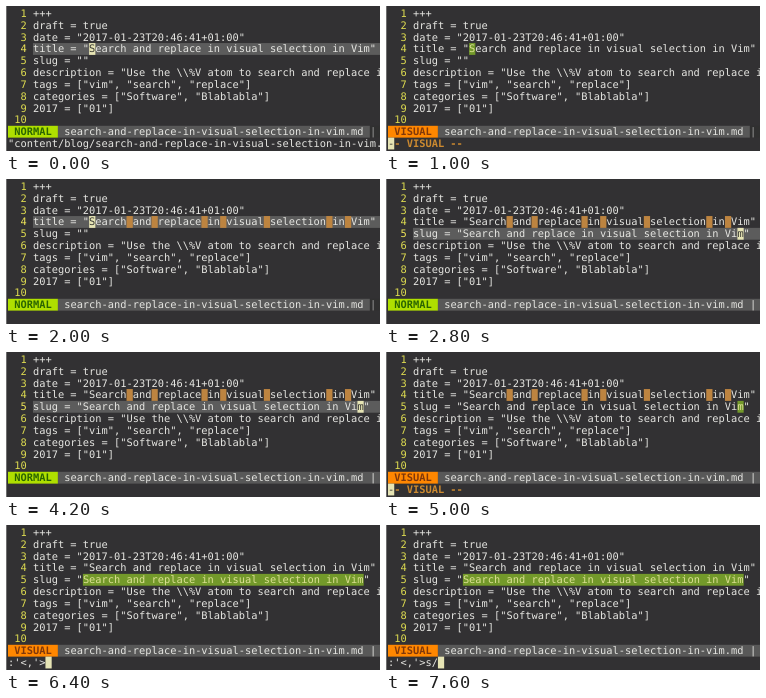
Write an HTML page that moves like this. It is 374x145 px and loops after 8 s.

```html
<!DOCTYPE html>
<html lang="en">
<head>
<meta charset="utf-8">
<title>Vim session</title>
<style>
  html, body { margin: 0; width: 100%; height: 100%; overflow: hidden; background: #323133; }
  svg { display: block; width: 374px; height: 145px; }
  text {
    font: 10.365px "DejaVu Sans Mono", monospace;
    white-space: pre;
    text-rendering: geometricPrecision;
  }
</style>
</head>
<body>
<svg id="screen" viewBox="0 0 374 145"></svg>
<script>
const LOOP = 8000;
const CELL = 6.24, LINE = 11.82, LEFT = 2, TOP = 1.6, WIDTH = 374, HEIGHT = 145, GUTTER = 4;
const STATUS = 10, COMMAND = 11;
const COLOR = {
  text: '#e6e6e2', number: '#dedc50', currentNumber: '#f0e658', border: '#6e6e6e',
  cursorLine: '#5c5c5c', cursor: '#e6e4b4', cursorText: '#3a3a34',
  match: '#bd8440', visual: '#73992a', visualText: '#dce094', modeMessage: '#cc8a30',
  statusFile: '#585858', statusRest: '#303030', statusDim: '#9e9e9e'
};
const MODES = {
  NORMAL: { back: '#afdf00', ink: '#2a6400' },
  VISUAL: { back: '#ff8700', ink: '#80380a' }
};
const TITLE = 'Search and replace in visual selection in Vim';
const FILE = 'search-and-replace-in-visual-selection-in-vim.md';
const TITLE_ROW = 3, TITLE_COL = 9, SLUG_ROW = 4, SLUG_COL = 8;
const LAST = TITLE.length - 1;

// Each step overrides the state before it; cursor and selection use [row, column(, length)].
const STEPS = [
  { at: 0, mode: 'NORMAL', slug: '', modified: false, matches: false, line: TITLE_ROW,
    cursor: [TITLE_ROW, GUTTER + TITLE_COL], selection: null,
    command: `"content/blog/${FILE}" 42L, 1337C` },
  { at: 1000, mode: 'VISUAL', line: null, command: '-- VISUAL --',
    cursor: [COMMAND, 0], selection: [TITLE_ROW, TITLE_COL, 1] },
  { at: 1200, cursor: [TITLE_ROW, GUTTER + TITLE_COL] },
  { at: 1400, cursor: [TITLE_ROW, GUTTER + TITLE_COL + LAST],
    selection: [TITLE_ROW, TITLE_COL, TITLE.length] },
  { at: 2000, mode: 'NORMAL', line: TITLE_ROW, command: '', matches: true,
    cursor: [TITLE_ROW, GUTTER + TITLE_COL], selection: null },
  { at: 2200, line: SLUG_ROW, cursor: [SLUG_ROW, GUTTER + SLUG_COL] },
  { at: 2600, slug: TITLE, modified: true, cursor: [SLUG_ROW, GUTTER + SLUG_COL + LAST] },
  { at: 5000, mode: 'VISUAL', line: null, command: '-- VISUAL --',
    cursor: [COMMAND, 0], selection: [SLUG_ROW, SLUG_COL + LAST, 1] },
  { at: 5200, cursor: [SLUG_ROW, GUTTER + SLUG_COL + LAST] },
  { at: 5400, matches: false, selection: [SLUG_ROW, SLUG_COL, TITLE.length] },
  { at: 6400, command: ":'<,'>", cursor: [COMMAND, 6] },
  { at: 7400, command: ":'<,'>s", cursor: [COMMAND, 7] },
  { at: 7600, command: ":'<,'>s/", cursor: [COMMAND, 8] }
];

const bufferLines = slug => [
  '+++',
  'draft = true',
  'date = "2017-01-23T20:46:41+01:00"',
  `title = "${TITLE}"`,
  `slug = "${slug}"`,
  'description = "Use the \\\\%V atom to search and replace in Vim"',
  'tags = ["vim", "search", "replace"]',
  'categories = ["Software", "Blablabla"]',
  '2017 = ["01"]',
  ''
];

const xOf = col => LEFT + col * CELL;
const yOf = row => TOP + row * LINE;
const escapeText = s => s.replace(/&/g, '&amp;').replace(/</g, '&lt;').replace(/>/g, '&gt;');

function block(row, col, length, fill) {
  const width = Math.min(length * CELL, WIDTH - xOf(col));
  return `<rect x="${xOf(col)}" y="${yOf(row)}" width="${width}" height="${LINE}" fill="${fill}"/>`;
}

function label(row, col, string, fill = COLOR.text, weight = 400) {
  return `<text x="${xOf(col)}" y="${yOf(row) + 9.4}" fill="${fill}"`
    + ` style="font-weight:${weight}">${escapeText(string)}</text>`;
}

function statusLine({ mode, modified }) {
  const { back, ink } = MODES[mode];
  const fileEnd = 9 + FILE.length + 1;
  return block(STATUS, 0, 8, back)
    + label(STATUS, 1, mode, ink, 700)
    + block(STATUS, 8, modified ? 99 : fileEnd - 8, COLOR.statusFile)
    + (modified ? '' : block(STATUS, fileEnd, 9, COLOR.statusRest))
    + label(STATUS, 9, FILE)
    + label(STATUS, fileEnd, '|', modified ? COLOR.text : COLOR.statusDim);
}

function render(state) {
  const lines = bufferLines(state.slug);
  let out = `<rect width="1" height="${HEIGHT}" fill="${COLOR.border}"/>`;
  if (state.line !== null) out += block(state.line, GUTTER, 99, COLOR.cursorLine);
  if (state.matches) {
    [...TITLE].forEach((char, i) => {
      if (char === ' ') out += block(TITLE_ROW, GUTTER + TITLE_COL + i, 1, COLOR.match);
    });
  }
  lines.forEach((line, row) => {
    const ink = row === state.line ? COLOR.currentNumber : COLOR.number;
    out += label(row, 0, String(row + 1).padStart(3), ink) + label(row, GUTTER, line);
  });
  if (state.selection) {
    const [row, col, length] = state.selection;
    out += block(row, GUTTER + col, length, COLOR.visual)
      + label(row, GUTTER + col, lines[row].substr(col, length), COLOR.visualText);
  }
  out += statusLine(state);
  const message = state.command.startsWith('--');
  out += label(COMMAND, 0, state.command, message ? COLOR.modeMessage : COLOR.text, message ? 700 : 400);

  const [row, col] = state.cursor;
  const under = row === COMMAND ? state.command[col] : lines[row][col - GUTTER];
  out += block(row, col, 1, COLOR.cursor);
  return out + label(row, col, under || '', COLOR.cursorText);
}

const screen = document.getElementById('screen');
const start = performance.now();
let shown = -1;

function update() {
  const time = (performance.now() - start) % LOOP;
  const count = STEPS.filter(step => step.at <= time).length;
  if (count !== shown) {
    screen.innerHTML = render(Object.assign({}, ...STEPS.slice(0, count)));
    shown = count;
  }
  requestAnimationFrame(update);
}
update();
</script>
</body>
</html>
```
